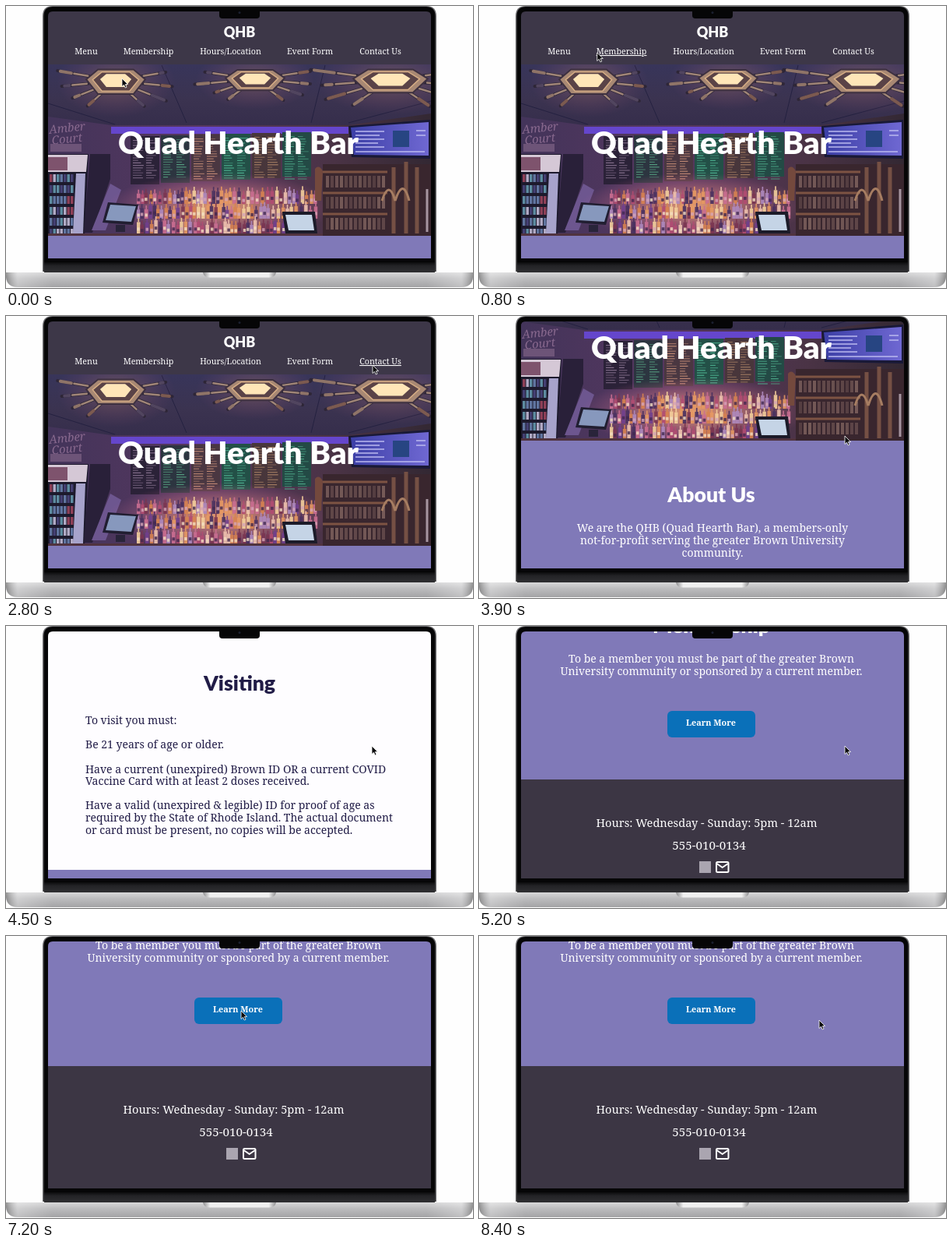
An HTML page that plays this animation: 600x362 px, repeating every 8600 ms.

```html
<!DOCTYPE html>
<html lang="en">
<head>
<meta charset="utf-8">
<title>Bar website on a laptop</title>
<style>
  html, body { margin: 0; width: 100%; height: 100%; overflow: hidden; background: #fefefe; }
  svg { display: block; width: 100%; height: 100%; }
  text { font-family: "Noto Serif", serif; font-size: 14px; fill: #fff; }
  .mid { text-anchor: middle; }
  .head { font-family: Lato, sans-serif; font-weight: 900; font-size: 26.6px; text-anchor: middle; }
  .dark { fill: #211c47; }
  #nav text { font-size: 10.7px; }
  #nav .hover { text-decoration: underline; }
</style>
</head>
<body>
<svg viewBox="0 0 600 362">
  <defs>
    <clipPath id="screen"><path d="M54 324V13Q54 7 60 7H540Q546 7 546 13V324Z"/></clipPath>
    <clipPath id="photo"><rect x="54" y="75" width="492" height="220"/></clipPath>
    <linearGradient id="ceiling" x2="0" y2="1">
      <stop stop-color="#38355a"/><stop offset=".5" stop-color="#3b3350"/><stop offset="1" stop-color="#342c4a"/>
    </linearGradient>
    <linearGradient id="room">
      <stop stop-color="#43345a"/><stop offset=".4" stop-color="#56375f"/><stop offset=".75" stop-color="#4a3345"/><stop offset="1" stop-color="#332833"/>
    </linearGradient>
    <linearGradient id="tv"><stop stop-color="#3c3fa6"/><stop offset="1" stop-color="#6f68d2"/></linearGradient>
    <radialGradient id="glow"><stop stop-color="#ffb271" stop-opacity=".85"/><stop offset="1" stop-color="#d8689a" stop-opacity="0"/></radialGradient>
    <linearGradient id="metal" x2="0" y2="1">
      <stop stop-color="#d8d8d9"/><stop offset=".4" stop-color="#bdbdbf"/><stop offset="1" stop-color="#a3a3a5"/>
    </linearGradient>
    <linearGradient id="ends">
      <stop stop-color="#555" stop-opacity=".5"/><stop offset=".025" stop-color="#fff" stop-opacity=".3"/>
      <stop offset=".1" stop-color="#fff" stop-opacity="0"/><stop offset=".9" stop-color="#fff" stop-opacity="0"/>
      <stop offset=".975" stop-color="#fff" stop-opacity=".3"/><stop offset="1" stop-color="#555" stop-opacity=".5"/>
    </linearGradient>
    <linearGradient id="groove">
      <stop stop-color="#8c8c8e"/><stop offset=".1" stop-color="#f0f0f0"/><stop offset=".9" stop-color="#f0f0f0"/><stop offset="1" stop-color="#8c8c8e"/>
    </linearGradient>
    <linearGradient id="hinge" x2="0" y2="1"><stop stop-color="#0c0c0d"/><stop offset=".35" stop-color="#232326"/><stop offset="1" stop-color="#303033"/></linearGradient>
  </defs>

  <!-- lid -->
  <path d="M47 341V13Q47 0 60 0H540Q553 0 553 13V341Z" fill="#68686b"/>
  <path d="M48.5 341V13Q48.5 1 60 1H540Q551.5 1 551.5 13V341Z" fill="#060607"/>

  <g clip-path="url(#screen)">
    <g id="page">
      <rect x="54" width="492" height="75" fill="#3d3748"/>
      <text class="head" x="300" y="40" style="font-size:18px">QHB</text>
      <g id="nav" class="mid">
        <text x="103" y="62">Menu</text>
        <text x="183" y="62">Membership</text>
        <text x="288.5" y="62">Hours/Location</text>
        <text x="390.5" y="62">Event Form</text>
        <text x="481" y="62">Contact Us</text>
      </g>

      <g clip-path="url(#photo)">
        <rect x="54" y="75" width="492" height="90" fill="url(#ceiling)"/>
        <path d="M54 142L135 153H440L546 138V295H54Z" fill="url(#room)"/>
        <path d="M54 125L140 152M546 122L440 150M200 76L232 150M410 76L392 150" stroke="#242140" fill="none"/>
        <path d="M135 155H440V164H135Z" fill="#6546cc"/>
        <g id="lamps"></g>
        <g id="boards"></g>
        <g transform="rotate(-6 85 165)" font-style="italic" opacity=".6">
          <text x="56" y="161" style="font-size:15px;fill:#b48bb0">Amber</text>
          <text x="58" y="175" style="font-size:15px;fill:#b48bb0">Court</text>
        </g>
        <rect x="57" y="177" width="40" height="10" fill="#6d5478"/>
        <!-- fridge -->
        <path d="M54 190H106L101 295H54Z" fill="#1d1a2d"/>
        <path d="M54 191H105L103 213H54Z" fill="#d5c8d6"/>
        <path d="M54 194H79V211H54Z" fill="#7e536d"/>
        <path d="M90 215H102L99 292H86Z" fill="#a7a3cb"/>
        <g id="cans"></g>
        <path d="M108 190H134V222L111 291H100Z" fill="#292039"/>
        <path d="M134 228L148 236L128 288H110Z" fill="#6d568f"/>
        <ellipse cx="275" cy="258" rx="145" ry="44" fill="url(#glow)"/>
        <g id="bottles"></g>
        <!-- counter, tills and glass racks -->
        <path d="M54 292H546V295H54Z" fill="#50333f"/>
        <path d="M131 252L170 255L163 281L124 278Z" fill="#211e31"/>
        <path d="M134 255L167 257L161 277L128 275Z" fill="#8798bd"/>
        <path d="M141 281H153V290H141Z" fill="#29243a"/>
        <path d="M355 264H397L400 292H359Z" fill="#1c1b29"/>
        <path d="M359 268H393L396 288H363Z" fill="#c5d4e6"/>
        <path d="M407 203H546V295H407Z" fill="#39262e"/>
        <path d="M407 213H490M407 240H490M407 267H490" stroke="#7d5343" stroke-width="3"/>
        <g id="glasses"></g>
        <path d="M397 209Q402 203 407 212L405 250H397Z" fill="#74493d"/>
        <path d="M498 207V292M514 200V292M528 207V292" stroke="#755044" stroke-width="5"/>
        <path d="M483 250Q492 222 500 250M500 250Q510 219 518 250" stroke="#a67d62" stroke-width="3" fill="none"/>
        <path d="M541 235V290" stroke="#a695a0" stroke-width="3"/>
        <!-- television -->
        <path d="M440 154L545 146V196L444 194Z" fill="#191937"/>
        <path d="M443 156L543 149V192L447 191Z" fill="url(#tv)"/>
        <path d="M449 161H486M449 166H480M449 171H486M449 176H478M449 181H486M527 160H539M527 166H539M449 187H538" stroke="#bab9ef" stroke-width="1.5"/>
        <rect x="497" y="160" width="21" height="21" fill="#274582"/>
      </g>
      <text class="head" x="298.5" y="190" style="font-size:40.4px">Quad Hearth Bar</text>

      <rect x="54" y="295" width="492" height="195" fill="#8079b8"/>
      <text class="head" x="298.5" y="374">About Us</text>
      <g class="mid">
        <text x="300" y="412">We are the QHB (Quad Hearth Bar), a members-only</text>
        <text x="300" y="428">not-for-profit serving the greater Brown University</text>
        <text x="300" y="444">community.</text>
      </g>

      <rect x="54" y="490" width="492" height="309" fill="#fefdff"/>
      <text class="head dark" x="300" y="569">Visiting</text>
      <g>
        <text class="dark" x="102" y="612">To visit you must:</text>
        <text class="dark" x="102" y="643">Be 21 years of age or older.</text>
        <text class="dark" x="102" y="674.5">Have a current (unexpired) Brown ID OR a current COVID</text>
        <text class="dark" x="102" y="690">Vaccine Card with at least 2 doses received.</text>
        <text class="dark" x="102" y="721">Have a valid (unexpired &amp; legible) ID for proof of age as</text>
        <text class="dark" x="102" y="737">required by the State of Rhode Island. The actual document</text>
        <text class="dark" x="102" y="753">or card must be present, no copies will be accepted.</text>
      </g>

      <rect x="54" y="799" width="492" height="267" fill="#8079b8"/>
      <text class="head" x="298.5" y="878">Membership</text>
      <g class="mid">
        <text x="298.5" y="916">To be a member you must be part of the greater Brown</text>
        <text x="298.5" y="932">University community or sponsored by a current member.</text>
        <rect x="242" y="978" width="113" height="34" rx="6" fill="#0a70b9"/>
        <text x="298" y="997" style="font-size:10.8px;font-weight:bold">Learn More</text>
      </g>

      <rect x="54" y="1066" width="492" height="170" fill="#3c3644"/>
      <g class="mid">
        <text x="292.5" y="1127" style="font-size:14.6px">Hours: Wednesday - Sunday: 5pm - 12am</text>
        <text x="295.5" y="1155.5" style="font-size:15.2px">555-010-0134</text>
      </g>
      <rect x="283" y="1171" width="15" height="15" fill="#aaa5b0"/>
      <g fill="none" stroke="#fff" stroke-width="2" stroke-linejoin="round">
        <rect x="305" y="1172" width="15.5" height="13" rx="1.5"/>
        <path d="M305.5 1174L312.7 1179L320 1174"/>
      </g>
    </g>
    <path id="cursor" d="M0 0V10.5L2.5 8.3L4.2 12L6 11.2L4.4 7.6H7.6Z" fill="#0b0b0d" stroke="#fff" stroke-width=".8"/>
  </g>

  <!-- notch, hinge and base -->
  <path d="M274 1H326V12Q326 16 322 16H278Q274 16 274 12Z" fill="#060607"/>
  <circle cx="300" cy="8.5" r="1.5" fill="#1b2030"/>
  <rect x="49" y="329" width="502" height="13" fill="url(#hinge)"/>
  <path d="M0 342H600V348Q599 361 584 361H16Q1 361 0 348Z" fill="url(#metal)"/>
  <path d="M0 342H600V348Q599 361 584 361H16Q1 361 0 348Z" fill="url(#ends)"/>
  <path d="M253 342H347Q346 348.5 338 348.5H262Q254 348.5 253 342Z" fill="url(#groove)"/>
</svg>
<script>
const LOOP = 8600, STEP = 100;
const $ = id => document.getElementById(id);

function add(parent, tag, attrs) {
  const node = document.createElementNS("http://www.w3.org/2000/svg", tag);
  for (const key in attrs) node.setAttribute(key, attrs[key]);
  $(parent).append(node);
}

let seed = 11;
const random = () => (seed = (seed * 16807) % 2147483647) / 2147483647;
const between = (a, b) => a + random() * (b - a);
const pick = list => list[Math.floor(random() * list.length)];
const box = (parent, x, y, width, height, fill, opacity = 1) =>
  add(parent, "rect", { x, y, width, height, fill, opacity });

// Hexagonal ceiling lamp with wooden tap handles pointing outwards
function lamp(cx, cy, w, h) {
  const ring = [[-1, -.1], [-.6, -.8], [.6, -.8], [1, -.1], [.6, .95], [-.6, .95]];
  const hexagon = (scale, lift = 0) =>
    ring.map(([x, y]) => [cx + x * w * scale, cy + y * h * scale - lift]).join(" ");
  add("lamps", "ellipse", { cx, cy, rx: w * 2, ry: h * 2.6, fill: "url(#glow)", opacity: .3 });
  for (const degrees of [-20, 12, 40, 62, 118, 140, 168, 200]) {
    const dx = Math.cos(degrees * Math.PI / 180) * w, dy = Math.sin(degrees * Math.PI / 180) * h;
    const reach = between(1.8, 2.3);
    const line = (from, to, stroke, width) => add("lamps", "line", {
      x1: cx + dx * from, y1: cy + dy * from, x2: cx + dx * to, y2: cy + dy * to,
      stroke, "stroke-width": width, "stroke-linecap": "round"
    });
    line(.9, reach, "#2e2637", 4);
    line(1, 1.5, "#a08577", 2.5);
    line(1.6, reach - .1, pick(["#7c5a50", "#51455f", "#8f7468"]), 4);
  }
  add("lamps", "polygon", { points: hexagon(1), fill: "#a88873", stroke: "#3d3040", "stroke-width": 2 });
  add("lamps", "polygon", { points: hexagon(.78), fill: "#5a4347", stroke: "#d6ad85", "stroke-width": 1.5 });
  add("lamps", "polygon", { points: hexagon(.53, 1), fill: "#ffe6b8" });
}

function buildPhoto() {
  lamp(141, 96, 38, 18);
  lamp(320, 94, 38, 15);
  lamp(494, 95, 48, 17);

  // Chalkboard menus: [board, ink]
  const boards = [
    ["#2b2238", "#8d7794"], ["#2c3540", "#58a584"], ["#4a3741", "#c99078"],
    ["#235047", "#4fb593"], ["#48363b", "#b58a6a"], ["#234a45", "#4fae8c"]
  ];
  boards.forEach(([board, ink], i) => {
    const x = 160 + i * 39, top = 167 - i;
    box("boards", x, top, 37, 62 - i, board);
    for (let y = top + 5; y < 222; y += 3.2)
      for (const column of [3, 20]) box("boards", x + column, y, between(6, 14), 1.2, ink, between(.4, .95));
  });

  for (let y = 216; y < 290; y += 14)
    for (let x = 56; x < 86; x += 4.5)
      box("cans", x, y, 3.5, 10, pick(["#8d3f57", "#60749f", "#b0a9c4", "#443f72", "#5d8ba0"]));

  // Bottle shelves, back row first
  const glass = ["#e79a62", "#b24c72", "#71408e", "#f4d09c", "#cb6e92", "#7b3550", "#af8abf", "#d98350", "#493060", "#f0c4b0"];
  for (const base of [254, 273, 293])
    for (let x = 168; x < 398; x += between(4, 7)) {
      const height = between(11, 18), color = pick(glass);
      box("bottles", x, base - height, 4.5, height, color, .9);
      box("bottles", x + 1.4, base - height - 5, 1.7, 5, color, .9);
      box("bottles", x + .5, base - height * .55, 3.5, 4, pick(["#f3dec2", "#42284f", "#d5a4b7"]), .8);
    }

  for (const y of [218, 245, 272])
    for (let x = 411; x < 487; x += 6) box("glasses", x, y, 4, 15, "#94746d", between(.3, .7));
}

// One long scroll: speeds up, runs steadily, slows down (times in ms, lengths in px)
function scrollAt(time) {
  const start = 3480, ramp = 380, speed = .585, distance = 899;
  const span = distance / speed + ramp;
  const elapsed = Math.min(Math.max(time - start, 0), span);
  const travel = t => speed * (t < ramp ? t * t / (2 * ramp) : t - ramp / 2);
  return elapsed < span / 2 ? travel(elapsed) : distance - travel(span - elapsed);
}

// Pointer stops: time, x, y
const cursorKeys = [
  [0, 149, 93], [500, 104, 61], [1600, 279, 57], [2800, 471, 63],
  [3300, 470, 154], [6300, 470, 154], [6900, 302, 96], [7300, 302, 96], [7900, 437, 108]
];

function cursorAt(time) {
  const next = cursorKeys.findIndex(key => key[0] > time);
  if (next < 0) return cursorKeys[cursorKeys.length - 1].slice(1);
  const [t0, x0, y0] = cursorKeys[next - 1], [t1, x1, y1] = cursorKeys[next];
  const p = (time - t0) / (t1 - t0);
  return [x0 + (x1 - x0) * p, y0 + (y1 - y0) * p];
}

const navItems = [...document.querySelectorAll("#nav text")];

function draw() {
  const time = Math.floor(performance.now() % LOOP / STEP) * STEP;
  const scroll = Math.round(scrollAt(time));
  const [x, y] = cursorAt(time);
  $("page").setAttribute("transform", `translate(0 ${-scroll})`);
  $("cursor").setAttribute("transform", `translate(${x} ${y})`);
  for (const item of navItems) {
    const area = item.getBBox();
    const over = x >= area.x && x <= area.x + area.width && Math.abs(y + scroll - 59) < 9;
    item.classList.toggle("hover", over);
  }
  requestAnimationFrame(draw);
}

buildPhoto();
draw();
</script>
</body>
</html>
```
